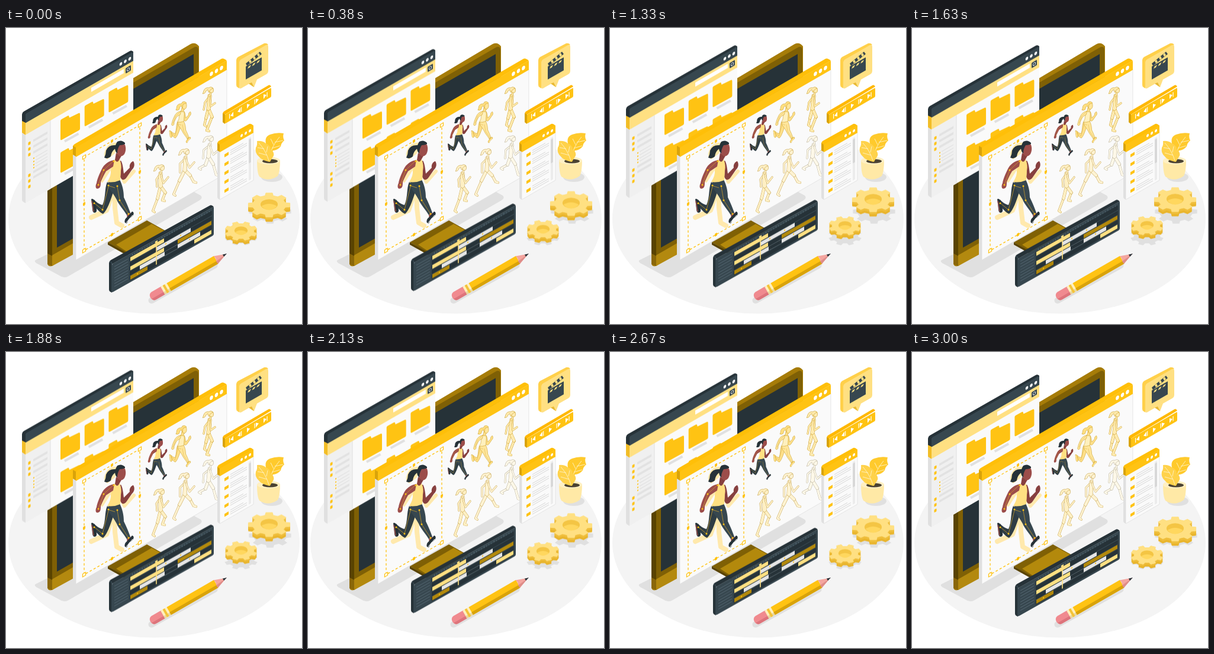
Write an HTML page that moves like this. It is 500 px wide and 500 px high and loops after 3040 ms.

```html
<!DOCTYPE html>
<html lang="en">
<head>
<meta charset="utf-8">
<title>Frame by frame animation desk</title>
<style>
html, body { margin: 0; width: 100%; height: 100%; overflow: hidden; background: #fff; }
svg { display: block; width: 100vw; height: 100vh; }
</style>
</head>
<body>
<svg id="stage" viewBox="0 0 500 500"></svg>
<script>
const GOLD = '#ffc313', PALE = '#ffe082', DARK = '#37474f', INK = '#263238', SKIN = '#9c4d4a';
const GREY = '#e0e0e0', PAPER = '#fafafa';

const poly = (pts, fill, more = '') => `<polygon points="${pts}" fill="${fill}" ${more}/>`;
const path = (d, fill, more = '') => `<path d="${d}" fill="${fill}" ${more}/>`;
const line = (d, color, w, more = '') =>
  `<path d="${d}" fill="none" stroke="${color}" stroke-width="${w}" ${more}/>`;
const rect = (x, y, w, h, fill, more = '') =>
  `<rect x="${x}" y="${y}" width="${w}" height="${h}" fill="${fill}" ${more}/>`;
const oval = (x, y, rx, ry, fill, more = '') =>
  `<ellipse cx="${x}" cy="${y}" rx="${rx}" ry="${ry}" fill="${fill}" ${more}/>`;
const each = (list, fn) => list.map(fn).join('');
const round = 'stroke-linecap="round" stroke-linejoin="round"';

// Plane facing left: x runs up to the right, y straight down.
const iso = (x, y, body, slope = .577) =>
  `<g transform="matrix(1 ${-slope} 0 1 ${x} ${y})">${body}</g>`;
const float = body => `<g class="float">${body}</g>`;

function floor() {
  return oval(250, 322, 246, 160.5, '#f4f4f4') +
    path('M50 392L72 381L285 255L318 277L329 283Q333 287 327 291L106 419Q98 424 90 418L51 397Q47 394 50 392Z', GREY);
}

function monitor() {
  return path('M70 180Q70 171 78 166L312 27Q320 23 326 31V240L78 402Q70 404 70 397Z', '#a67c08') +
    path('M78 180Q78 172 86 167L317 33Q325 29 325 38V240L78 384Z', '#7f6005') +
    poly('70,175 78,180 78,402 70,398', '#594300') +
    poly('70,381 78,385 78,402 70,399', '#8a6708') +
    poly('78,384 120,360 120,379 78,402', '#b3890f') +
    poly('86,177 317,44 317,240 86,371', INK) +
    poly('172,362 238,325 272,344 206,382', '#7f6005') +
    poly('186,366 246,331 272,345 209,381', '#b3890c') +
    poly('172,362 206,381 206,385 172,366', '#594300');
}

function folder(x, y) {
  return path(`M${x} ${y}q0-2 2-3l10-5.6q2-1 2.500 1l.5 2l15.500-7.500q2.500-1 2.500 1.500V${y + 13}q0 2-2 3L${x + 2} ${y + 32}q-2 1-2-1Z`, GOLD) +
    line(`M${x + 7} ${y + 34.500}l23.500-13`, GREY, 4);
}

function filesWindow() {
  const bars = each([11, 21, 31, 64, 73], y => rect(13, y + 4, 24, 4, '#e2e2e2'));
  const keys = each([15, 24.5, 34, 69, 78.500, 88], y => rect(4.500, y, 4, 5, GOLD, 'rx="1"'));
  const notes = each([46, 51.500, 57, 62], y =>
    rect(13, y, 2, 2, GOLD) + rect(17, y, 20, 1.200, '#dedede'));
  const front = rect(0, 35, 182, 116, PAPER) + rect(0, 35, 42, 116, '#f0f0f0') +
    rect(41.500, 35, 1, 116, GREY) +
    path('M0 18V2Q0 0 2 0H180Q182 0 182 2V18Z', DARK) + rect(0, 15.500, 182, 20, PALE) +
    rect(111, 20, 55, 7, '#fff') + rect(169, 20.500, 9, 9, DARK, 'rx="1"') +
    oval(173.500, 25, 2.200, 2.200, 'none', 'stroke="#fff" stroke-width=".8"') +
    `<g transform="translate(0 36)">${bars}${keys}${notes}</g>` +
    each([161, 168.500, 176], x => oval(x, 8.500, 2.300, 2.700, '#fff'));
  const folders = each([0, 1], r => each([0, 1, 2], c => folder(92 + c * 40.700, 157 + r * 55 - c * 23.500)));
  return float(
    path('M27 146Q27 143 30 141L209 39Q212 37 215 40L215 43L33 147L33 162L27 158Z', INK) +
    poly('27,157 33,160 33,181 27,177', '#f2bd27') +
    path('M27 177L33 181V296L29 293.500Q27 292 27 290Z', GREY) +
    iso(33, 145, front) + folders);
}

// Points: head, neck, hip, then elbow/hand twice and knee/foot twice.
function sketch(pose, fill, edge) {
  const n = pose.split(' ');
  const [hx, hy] = n[0].split(',').map(Number);
  const limb = (d, w) => line(d, edge, w + .9, round) + line(d, fill, w, round);
  const chain = (...ids) => 'M' + ids.map(i => n[i]).join('L');
  const thin = `stroke="${edge}" stroke-width=".6"`;
  return limb(chain(1, 3, 4), 2.200) + limb(chain(2, 9, 10) + 'l3 2', 3) +
    limb(chain(2, 7, 8) + 'l4 1', 3.400) + limb(chain(2, 9), 4.400) + limb(chain(2, 7), 4.600) +
    limb(chain(1, 2), 6) + limb(chain(1, 5, 6), 2.200) + limb(chain(1, 0), 2.200) +
    oval(hx, hy, 3.500, 4.600, fill, thin) +
    path(`M${hx + 3} ${hy - 3}q-4-4-7-1q-7-1-9 5q-1 4-2 5q5 0 6-5l3-2q0 4 2 5q1-5 4-6Z`, fill, thin);
}

const LIVE = { skin: SKIN, shade: '#87403f', legs: DARK, far: '#2f3d44', ink: INK, top: PALE, rig: '#d8a52d' };
const TINT = { skin: '#ffe69c', shade: '#ffe08a', legs: '#ffe69c', far: '#ffe08a', ink: '#ffdf80', top: '#fff0bd', rig: '#c79a22' };

function runner(c) {
  return path('M191 226C194 238 194 245 193 251C195 258 200 258 204 252L213 239C217 236 218 229 215 225C211 226 208 231 209 236L199 246C198 238 197 228 194 224Z', c.shade) +
    path('M171 260C166 272 169 286 163 299C158 298 152 294 149 290L146 296C151 303 157 311 164 314C171 308 176 293 183 272Z', c.far) +
    path('M173 258L192 256C197 266 199 276 199 286C204 296 207 304 210 312L204 316C198 306 190 298 187 290C184 284 178 276 172 268Z', c.legs) +
    path('M204 316L210 312L212 316L205 322Z', c.skin) +
    path('M201 329Q199 324 204 320L213 310Q217 311 215 316Q212 320 208 322L204 330Z', c.ink) +
    line('M203 329L214 316', '#fff', 1) +
    path('M144 289Q147 287 150 292L153 306Q154 312 149 312Q146 311 146 306Z', c.ink) +
    line('M145 292L148 310', c.skin, 1.500) +
    path('M181 223L192 222Q196 232 194 241L193 257Q182 262 171 260Q178 249 177 241Z', c.top) +
    path('M186 211L195 216L191 223Q188 229 184 223Z', c.shade) +
    path('M183 223C174 224 165 231 162 238C158 246 154 255 153 262C150 268 152 273 156 271C160 270 160 265 160 260C163 253 166 247 169 242L181 234Z', c.skin) +
    path('M191 194Q201 192 202 201Q203 207 200 213Q196 218 191 216Q187 213 187 205Z', c.skin) +
    path('M201 194Q195 188 188 192Q186 195 185 198Q173 197 169 207Q169 213 166 219Q172 222 177 217Q178 209 184 204Q185 210 188 212Q188 204 192 198Q197 198 201 196Z', c.ink) +
    line('M182 224L165 240L156 265M172 266L184 270M173 268L163 307L148 295M188 268L192 291L207 314', c.rig, .7);
}
const small = (x, y, c, more = '') => `<g transform="translate(${x} ${y}) scale(.5)" ${more}>${runner(c)}</g>`;

function mainWindow() {
  const ghost = path('M190 194Q173 191 167 208Q163 216 171 222L184 212Z', '#ffe9ad') +
    line('M182 264Q176 292 170 308L144 320M183 266L184 304L187 329L196 334', '#ffe9ad', 8, round) +
    line('M186 228L200 260L216 242M180 230L162 258', '#ffe9ad', 6, round);
  const joints = each(['182,225', '165,240', '156,265', '173,266', '188,267', '192,291', '163,307', '149,296', '207,314'],
    p => `<circle cx="${p.split(',')[0]}" cy="${p.split(',')[1]}" r="1.500" fill="${GOLD}"/>`);
  const handle = (x, y) => iso(x, y, rect(-2.500, -2.500, 5, 5, '#fff', `stroke="${GOLD}" stroke-width="1.300"`));
  const front = rect(0, 15, 255, 175, PAPER, `stroke="${GREY}" stroke-width=".7"`) +
    path('M0 16V2Q0 0 2 0H253Q255 0 255 2V16Z', GOLD) +
    each([229, 237.500, 246], x => oval(x, 7.500, 2.800, 3.500, '#fff'));
  return path('M113 200Q113 198 116 196L364 52Q367 50 373 55L118 203V217L113 214Z', '#ffbf08') +
    poly('113,199 118,202 118,217 113,214', '#d9a30a') +
    path('M113 214L118 217V392L115 390Q113 389 113 387Z', GREY) +
    iso(118, 202, front) +
    line('M132 218L226 164V322L132 376Z', GOLD, 1.300, 'stroke-dasharray="4 3.500"') +
    handle(132, 218) + handle(226, 164) + handle(226, 322) + handle(132, 376) +
    each([[179, 191], [226, 243], [179, 349], [132, 297]], ([x, y]) => iso(x, y, rect(-2, -2.500, 4, 5, GOLD, 'rx="1"'))) +
    ghost + runner(LIVE) + joints + small(164, 51, LIVE) +
    small(204, 29, TINT, 'stroke="#c79a22" stroke-width="1.100"') +
    sketch('347,105 344,115 342,136 336,126 334,138 346,132 353,127 348,150 339,173 338,152 335,164', '#ffebb0', '#c79a22') +
    sketch('264,236 261,246 261,267 254,256 255,268 266,262 274,252 269,278 264,291 256,288 248,309', '#fff0c4', '#c2a04a') +
    sketch('306,209 303,220 302,240 294,229 294,244 310,236 318,227 311,249 317,260 293,258 283,281', '#fff3d2', '#c2a04a') +
    sketch('347,187 344,198 342,217 334,206 333,220 350,214 357,208 350,230 355,248 337,231 326,237', '#fdf8e8', '#b5ae98');
}

function bubble() {
  const board = rect(0, 4, 27, 22, DARK) +
    each([5, 12.500, 20], x => poly(`${x},6.500 ${x + 4},6.500 ${x + 2},9.500 ${x - 2},9.500`, PALE));
  return path('M389 54Q389 51 392 49L436 26Q440 25 443 28L394 58V102L391 100Q389 99 389 96Z', '#ffd04a') +
    path('M394 58Q394 55 397 53L439 29Q443 27 443 32V73Q443 76 440 78L424 87L419 100L411 94L397 102Q394 103 394 100Z', PALE) +
    path('M410 94L419 100L415 92Z', '#e8b935') +
    iso(405, 61, board) +
    poly('405,60 429,40 432,44 407,64', DARK) +
    poly('410,56 413,53.500 415,57 412,59.500', PALE) +
    poly('417,50 420,47.500 422,51.500 419,54', PALE) +
    poly('424,44.500 427,42 429,46 426,48.500', PALE);
}

function player() {
  const back = 'M5 -4V4L0 0Z', next = 'M0 -4V4L5 0Z';
  const icon = (x, d, bar) => `<g transform="translate(${x} 7.500)">${path(d, '#fff')}${bar === undefined ? '' : rect(bar, -4, 1.200, 8, '#fff')}</g>`;
  return path('M366 145Q366 143 368 141L443 97Q446 95 448 99L370 146V162L367 160Q366 159 366 157Z', '#ffb800') +
    poly('366,144 370,146 370,162 366,159', '#d9a30a') +
    iso(370, 146, rect(0, 0, 78, 15.500, GOLD, 'rx="1.500"') +
      icon(9, back, -2) + icon(21, back, 6) + icon(37, next) + icon(52, next, -2.500) + icon(65, next, 5.500));
}

function listWindow() {
  const rows = each([0, 1, 2, 3, 4], i => {
    const y = 21 + i * 15;
    return rect(8, y, 7, 5, GOLD) + each([0, 3.500, 7], d =>
      rect(18, y - 1 + d, d ? 28 : 22, 1, '#d5d5d5'));
  });
  return path('M357 195Q357 193 359 191L411 162Q414 161 418 165L361 198V210L357 208Z', '#ffbf08') +
    poly('357,194 361,197 361,210 357,208', '#d9a30a') +
    path('M357 207L361 209V290L358 288Q357 287 357 285Z', GREY) +
    iso(361, 197, rect(0, 12, 57, 81, PAPER, `stroke="${GREY}" stroke-width=".7"`) +
      path('M0 13V1Q0 0 1 0H56Q57 0 57 1V13Z', GOLD) + rows +
      rect(49, 17, 4, 72, '#ececec') + rect(49, 20, 4, 40, '#d8d8d8') +
      each([37, 44, 51], x => oval(x, 6, 2, 2.400, '#fff')));
}

function plant() {
  return oval(449, 252, 18, 8, GREY) +
    path('M424 223Q424 245 428 251Q443 261 459 250Q463 243 463 223Z', '#ffe9a6') +
    oval(443.500, 224, 19.500, 6.500, '#fff0c4') + oval(446, 225, 13, 3.500, '#4b4333') +
    path('M443 222Q443 205 440 199Q435 184 446 180Q457 176 469 178Q467 184 470 190Q465 194 464 200Q458 207 451 207Q446 212 445 223Z', '#ffca2c') +
    line('M444 222Q448 200 462 184M449 203L463 199M454 193L468 190M452 197L447 187', '#fff2c4', .9) +
    path('M444 226Q431 223 427 217Q420 211 422 202Q425 198 424 191Q433 190 439 195Q447 198 447 205Q454 210 452 216Q449 220 446 226Z', '#ffd24a') +
    line('M444 224Q439 207 427 194M440 210L442 200M441 215L427 211M436 204L425 202', '#fff2c4', .9);
}

function gearPath(cx, cy, r, phase = 0) {
  const pts = [], teeth = 8, step = Math.PI * 2 / teeth;
  for (let i = 0; i < teeth; i++)
    for (const [a, k] of [[-.31, .79], [-.2, 1], [.2, 1], [.31, .79]]) {
      const t = (i + a + phase) * step;
      pts.push((cx + Math.cos(t) * r * k).toFixed(1) + ' ' + (cy + Math.sin(t) * r * k * .577).toFixed(1));
    }
  return 'M' + pts.join('L') + 'Z';
}

function gear(cx, cy, r, depth, phase) {
  let side = '';
  for (let d = depth; d > 0; d--) side += path(gearPath(cx, cy + d, r, phase), d > depth / 2 ? '#e9b52d' : '#efbe3c');
  const hx = r * .41, hy = hx * .6;
  return float(side + path(gearPath(cx, cy, r, phase), PALE, 'stroke="#ffe082" stroke-linejoin="round"') +
    oval(cx, cy - 1, hx, hy, '#f4c544') +
    path(`M${cx - hx * .9} ${cy + 2}Q${cx} ${cy - hy * .7} ${cx + hx * .9} ${cy + 2}Q${cx} ${cy + hy * 1.700} ${cx - hx * .9} ${cy + 2}Z`, '#ffd75e'));
}

function timeline() {
  const row = (x, end, i, fill) => rect(x - 179, 6 + i * 7.800, end - x, 6.500, fill);
  const list = each([0, 1, 2, 3, 4, 5, 6, 7], i => rect(4, 6 + i * 4.800, 23, .7, '#627580'));
  const ticks = each([...Array(32).keys()], i => rect(34 + i * 4.200, i % 4 ? 3 : 2, .6, i % 4 ? 1.500 : 2.500, '#78909c'));
  const front = rect(0, 0, 172, 48, DARK, 'rx="2"') + rect(30, 5, 139, 40, INK) + list + ticks +
    each([1, 2, 3, 4], i => rect(30, 5.300 + i * 7.800, 139, .6, '#455a64')) +
    row(210, 267, 0, PALE) + row(254, 312, 1, '#e6e6e6') + row(210, 267, 2, PALE) +
    row(290, 347, 2, '#b3890c') + row(226, 328, 3, '#e6e6e6') + row(268, 290, 3, INK) +
    row(210, 239, 4, '#b3890c') + row(318, 347, 4, PALE) +
    each([[43, 40.500], [91, 17], [116, 17], [131, 32]], ([x, y]) => oval(x, y, 1, 1.200, GOLD)) +
    rect(74.200, 4, 1.600, 39, PALE) + rect(73, 3, 4, 3, PALE);
  return float(
    path('M174 397Q174 394 177 392L344 300Q347 298 351 302L179 399V447L176 445.500Q174 444 174 442Z', INK) +
    line('M175 394L179 397V446', '#546e7a', .6) +
    iso(179, 399, front, .565));
}

function pencil() {
  const body = path('M2 -8H22V8H2Q-4 7-4 0Q-4 -7 2 -8Z', '#f08a8f') +
    path('M-3 3H22V8H2Q-2 8-3 3Z', '#dd747b') +
    rect(20, -8, 13, 16, '#fff0bd') + rect(20, 3, 13, 5, '#ead79c') + rect(24, -8, 4, 16, '#f3c33a') +
    rect(32, -8, 92, 16, GOLD) + rect(32, 2.500, 92, 5.500, '#d9a30a') +
    path('M123 -8L144 0L123 8Q126 5 123 2.500Q126 -3 123 -8Z', '#f4a6a0') +
    poly('123,8 123,2.500 144,0', '#df8d89') + poly('138,-2.300 145,0 138,2.300', INK);
  return line('M246 460L352 401', GREY, 11, 'stroke-linecap="round"') +
    `<g transform="translate(247.500 453.500) rotate(-30) scale(1 .93)">${body}</g>`;
}

document.getElementById('stage').innerHTML =
  floor() + monitor() + filesWindow() + mainWindow() + bubble() + player() + listWindow() + plant() +
  path(gearPath(446, 310, 36), GREY) + path(gearPath(397, 351, 28.500, .5), GREY) +
  gear(444.500, 299, 35.500, 8, 0) + gear(397, 343, 27.500, 7, .5) +
  timeline() + pencil();

const loop = 3040;
const steps = [[0, 0], [1500, -10], [3000, 0], [loop, 0]];
const frames = steps.map(([t, y]) => ({ offset: t / loop, transform: `translateY(${y}px)` }));
document.querySelectorAll('.float').forEach(el => el.animate(frames, { duration: loop, iterations: Infinity }));
</script>
</body>
</html>
```
